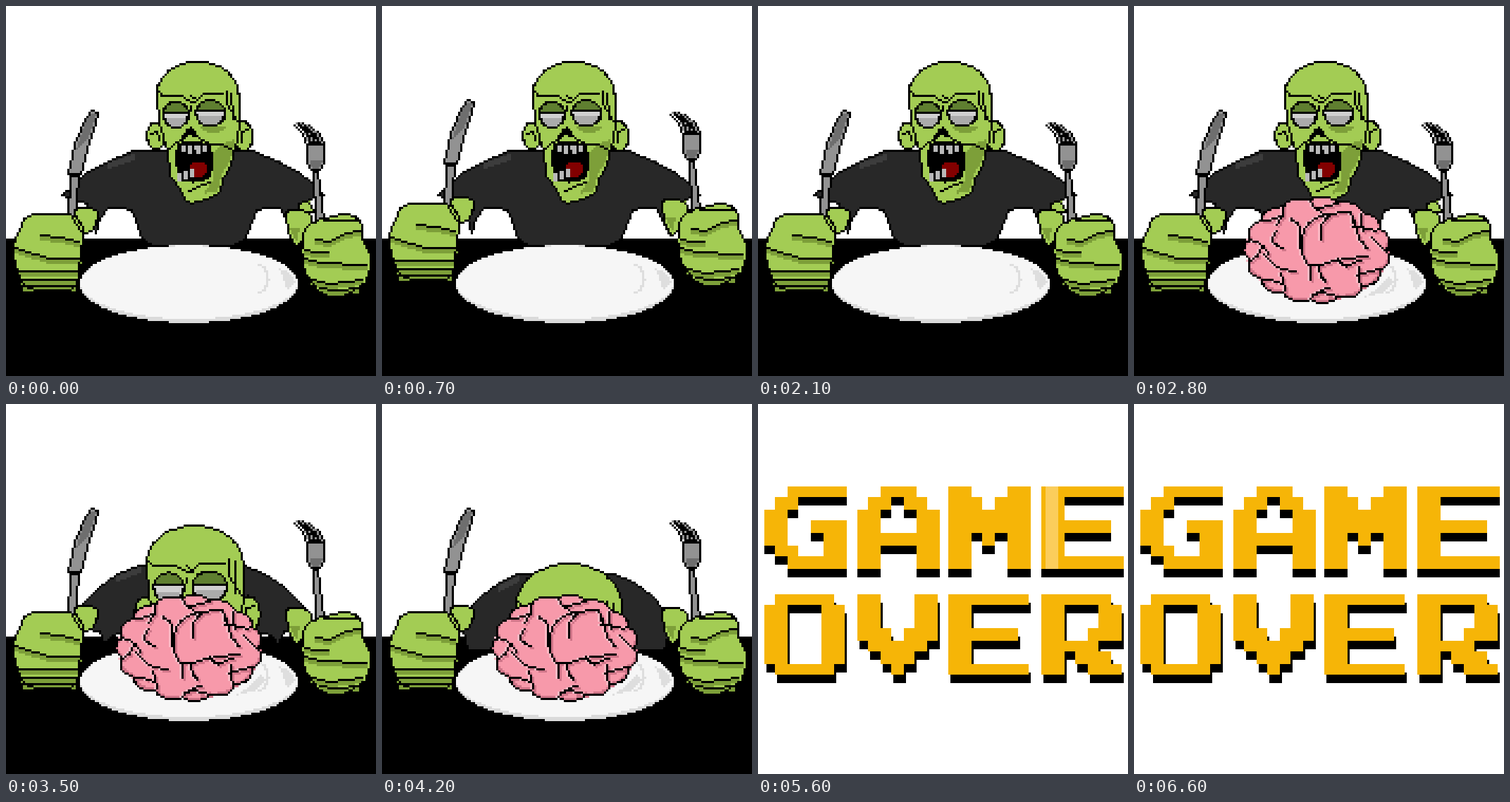
Recreate the animation shown at these times as an HTML page with a canvas. Size 525 px wide and 525 px high, loop 7 s.

```html
<!DOCTYPE html>
<html lang="en">
<head>
<meta charset="utf-8">
<title>Hungry zombie</title>
<style>
html, body { margin: 0; width: 100%; height: 100%; overflow: hidden; background: #fff; }
canvas { display: block; width: 525px; height: 525px; image-rendering: pixelated; }
</style>
</head>
<body>
<canvas id="stage" width="175" height="175"></canvas>
<script>
// Shapes use stage pixels; they are rasterised on a grid of 3px cells.
const CELL = 3, STEP = 100, LOOP = 7000;
const g = document.getElementById('stage').getContext('2d');
const SKIN = '#a3cc54', SHADE = '#7d9f39', LID = '#5f7f30', SHIRT = '#282828', PINK = '#f799aa',
  ROSE = '#cf7588', BLUSH = '#fbb9c4', STEEL = '#929292', IRON = '#6e6e6e', TOOTH = '#b9b9b9',
  EYE = '#d0d0d0', GOLD = '#f6b507', SHEEN = '#fbcd5c', BLACK = '#000';

const same = p => p;
const move = (dx, dy) => ([x, y]) => [x + dx, y + dy];
const range = (n, make) => Array.from({ length: n }, (_, i) => make(i));
const rect = (x, y, w, h, color) => { g.fillStyle = color; g.fillRect(x, y, w, h); };

function points(text) {
  const n = text.split(' ').map(Number);
  return range(n.length / 2, i => [n[2 * i], n[2 * i + 1]]);
}

// Catmull-Rom curve through a few key points.
function smooth(text, closed = false) {
  const p = points(text), n = p.length;
  const at = i => p[closed ? (i + n) % n : Math.min(Math.max(i, 0), n - 1)];
  const out = [];
  for (let i = 0; i < (closed ? n : n - 1); i++) {
    for (let t = 0; t < 1; t += .125) {
      out.push([0, 1].map(d => {
        const [a, b, c, e] = [-1, 0, 1, 2].map(j => at(i + j)[d]);
        return b + t / 2 * (c - a + t * (2 * a - 5 * b + 4 * c - e + t * (3 * (b - c) + e - a)));
      }));
    }
  }
  return closed ? out : [...out, p[n - 1]];
}

const arc = (cx, cy, rx, ry, from = 0, to = 2) => range(61, i => {
  const a = Math.PI * (from + (to - from) * i / 60);
  return [cx + rx * Math.cos(a), cy + ry * Math.sin(a)];
});

function fill(pts, color) {
  const p = pts.map(([x, y]) => [x / CELL, y / CELL]);
  for (let y = 0; y < 175; y++) {
    const c = y + .5, xs = [];
    p.forEach(([x1, y1], i) => {
      const [x2, y2] = p[(i + 1) % p.length];
      if ((y1 <= c) !== (y2 <= c)) xs.push(x1 + (c - y1) / (y2 - y1) * (x2 - x1));
    });
    xs.sort((a, b) => a - b);
    for (let i = 0; i + 1 < xs.length; i += 2) {
      const a = Math.round(xs[i]);
      rect(a, y, Math.round(xs[i + 1]) - a, 1, color);
    }
  }
}

function line(pts, color = BLACK) {
  const p = pts.map(q => q.map(v => Math.floor(v / CELL)));
  for (let i = 1; i < p.length; i++) {
    const [x, y] = p[i - 1], dx = p[i][0] - x, dy = p[i][1] - y;
    const n = Math.max(Math.abs(dx), Math.abs(dy), 1);
    for (let j = 0; j <= n; j++) rect(Math.round(x + dx * j / n), Math.round(y + dy * j / n), 1, 1, color);
  }
}

const outline = pts => line([...pts, pts[0]]);
function shape(pts, color, map = same) {
  const p = pts.map(map);
  fill(p, color);
  outline(p);
}
const patch = (text, color, map = same) => fill(points(text).map(map), color);

// Half of the shirt, as distance from the middle and height.
const shoulder = points('44 206 84 206 120 219 150 236 170 254 186 269');
const hem = points('174 272 150 280 140 323 132 302 122 287 104 285 88 290 80 312 72 330 56 339');

function drawBody(k) {
  if (!k) {
    shape(points('400 280 412 270 428 270 436 292 410 292'), SKIN);
    patch('416 273 428 272 433 281', SHADE);
  }
  const half = [...shoulder.map(([d, y]) => [d, y + 36 * k]), ...hem.map(([d, y]) => [d, y + (350 - y) * k])];
  const side = dir => half.map(([d, y]) => [266 - 4 * k + dir * d * (1 - .2 * k), y]);
  const left = side(-1);
  shape([...side(1), ...left.reverse()], SHIRT);
  left.reverse();
  for (const d of [4, 7, 10]) line(left.slice(1, 3).map(move(0, d)), '#3c3c3c');
}

function drawEye(cx, cy, rx, ry, m) {
  shape(arc(cx, cy, rx, ry), LID, m);
  shape(arc(cx, cy - 3, rx, ry + 3, 0, 1), EYE, m);
  fill(arc(cx, cy + 5, rx - 4, ry - 6, 0, 1).map(m), '#ababab');
}

function drawHead(drop) {
  const k = drop / 150, s = 1 + .3 * k;
  const m = ([x, y]) => [272 - 7 * k + (x - 272) * s, 78 + drop + (y - 78) * s];
  g.save();
  g.beginPath();
  g.rect(0, 0, 175, 113);
  g.clip();
  shape(arc(213, 184, 13, 19), SKIN, m);
  shape(arc(337, 185, 13, 21), SKIN, m);
  shape([...arc(272, 126, 58, 47, 1, 2), ...points('331 165 326 203 316 232 307 244 304 263 292 272 262 279 254 275 247 258 231 241 230 206 216 165')], SKIN, m);
  patch('326 188 306 196 294 210 294 246 281 266 300 264 306 241 318 218', SHADE, m);
  fill(arc(294, 171, 17, 9, 0, 1).map(m), SHADE);
  drawEye(241, 154, 18, 18, m);
  drawEye(290, 152, 21, 18, m);
  patch('247 189 258 173 265 172 274 187 267 187 262 182 254 188', BLACK, m);
  ['216 122 221 127 250 127 262 135 268 135 279 124 307 124', '262 127 271 134', '314 120 314 139 329 163',
    '320 123 321 161', '262 142 257 166', '206 180 215 177 217 190', '343 176 334 178 333 192',
    '231 203 242 194 253 188', '274 188 292 196 305 197 325 206', '258 263 279 254 289 250']
    .forEach(t => line(points(t).map(m)));
  shape(smooth('243 203 254 194 284 196 291 208 288 241 264 249 245 240', true), BLACK, m);
  fill(arc(273, 232, 13, 11).map(m), '#820000');
  const tooth = (x, y, h) => fill([[x, y], [x + 7, y], [x + 7, y + h], [x + 1, y + h]].map(m), TOOTH);
  for (let i = 0; i < 4; i++) tooth(248 + 10 * i, 198, i % 3 ? 12 : 9);
  for (let i = 0; i < 3; i++) tooth(243 + 9 * i, 237 - 3 * i, 12);
  g.restore();
}

function drawPlate() {
  fill(arc(259.5, 394.5, 154, 55), '#dadada');
  fill(arc(259.5, 392, 154, 52), '#f6f6f6');
  patch('388 373 400 376 412 392 399 402', '#dedede');
  line(arc(353, 387, 19, 21, -.4, .4), '#dedede');
}

// Brain: a scalloped ellipse, a crease hooking in from every notch, and the main folds.
const LOBES = 15;
const onBrain = (a, r) => [260 + 102 * r * Math.cos(a), 346 + 74 * r * Math.sin(a)];
const rim = range(180, i => {
  const a = i * Math.PI / 90;
  return onBrain(a, .96 + .06 * Math.abs(Math.sin(a * LOBES / 2)));
});
const creases = range(LOBES, i => range(9, j => {
  const a = i * 2 * Math.PI / LOBES;
  return onBrain(a + (i % 2 ? .03 : -.03) * j * j / 6, .96 - j * (.02 + .008 * (i % 3)));
}));
const folds = ['276 294 246 309 239 345 250 368 285 361 330 354', '264 332 270 304 302 291 312 308',
  '314 303 318 325 330 344', '222 301 236 315 234 342', '202 318 196 334 212 344',
  '290 358 300 369 322 361', '250 370 250 388', '262 367 265 381 272 391', '184 351 204 371 230 376'].map(t => smooth(t));

function drawBrain(m) {
  const lines = [...creases, ...folds];
  fill(rim.map(m), ROSE);
  fill(rim.map(([x, y]) => m([259 + (x - 259) * .97, 273 + (y - 273) * .97])), PINK);
  lines.forEach(f => line(f.map(move(3, 3)).map(m), ROSE));
  lines.forEach(f => line(f.map(move(-3, 0)).map(m), BLUSH));
  lines.forEach(f => line(f.map(m)));
  outline(rim.map(m));
}

function drawFist(keys, creases, m) {
  const base = smooth(keys, true).map(m);
  fill(base, SKIN);
  creases.forEach(t => {
    const crease = points(t).map(m);
    for (const d of [3, 6]) line(crease.map(move(0, d)), SHADE);
    line(crease);
  });
  outline(base);
}

function drawKnife(m) {
  shape(points('92 240 102 240 97 303 87 303'), STEEL, m);
  shape(points('122 149 130 151 127 167 118 193 106 239 87 238 97 196 112 160'), STEEL, m);
  patch('122 152 128 153 117 188 100 203 113 162', IRON, m);
}

function drawFork(m) {
  shape(points('437 234 443 234 450 308 440 308'), STEEL, m);
  for (let i = 0; i < 4; i++) {
    const tine = [[413 + 6.5 * i, 165 + 1.2 * i * i], [423 + 6.5 * i, 177 + i], [429 + 6.5 * i, 195]].map(m);
    line(tine.map(move(-3, 3)));
    line(tine.map(move(3, 0)));
    line(tine, STEEL);
  }
  shape(points('427 195 451 195 452 222 445 233 434 233 427 222'), STEEL, m);
  patch('430 219 450 219 444 231 435 231', IRON, m);
}

function drawHands(m) {
  drawKnife(m);
  shape(smooth('98 290 128 290 128 308 112 322', true), SKIN, m);
  drawFist('30 299 62 295 94 298 110 318 106 350 102 388 90 402 40 402 21 389 10 349 19 320',
    ['50 324 75 327 104 334', '12 343 60 357 105 358', '20 375 102 375', '21 388 101 388', '24 396 98 396'], m);
  line(points('93 300 105 319').map(m));
  drawFork(m);
  shape(smooth('400 291 424 291 434 306 412 339 401 318', true), SKIN, m);
  patch('402 316 417 316 412 335', SHADE, m);
  drawFist('425 316 455 300 490 297 505 310 505 330 516 353 510 390 472 413 444 405 424 375 420 342',
    ['440 331 460 333 480 323 502 318', '424 345 440 350 458 350', '424 357 445 364 510 366', '432 387 460 393 506 389', '444 400 470 404 498 399'], m);
  line(points('450 303 503 304').map(m));
}

const glyphs = {
  G: '..#####/.##..../##...../##..###/##...##/.##..##/..#####',
  A: '..###../.##.##./##...##/##...##/#######/##...##/##...##',
  M: '##...##/###.###/#######/#######/##.#.##/##...##/##...##',
  E: '#######/##...../##...../######./##...../##...../#######',
  O: '.#####./##...##/##...##/##...##/##...##/##...##/.#####.',
  V: '##...##/##...##/##...##/###.###/.#####./..###../...#...',
  R: '######./##...##/##...##/##..###/#####../##.###./##..###'
};

// Paints one letter; unit is the size of a dot, sheen an optional band from x to x + 6.
function letter(ch, x, y, unit, color, sheen = -9) {
  const at = i => Math.floor(i * unit);
  glyphs[ch].split('/').forEach((row, j) => [...row].forEach((dot, i) => {
    if (dot !== '#') return;
    const left = x + at(i), right = x + at(i + 1), top = y + at(j), h = at(j + 1) - at(j);
    rect(left, top, right - left, h, color);
    const a = Math.max(left, sheen), b = Math.min(right, sheen + 6);
    if (b > a) rect(a, top, b - a, h, SHEEN);
  }));
}

// Letters arrive in pairs, then a sheen crosses each in two steps.
function drawGameOver(n) {
  const lit = n - 50;
  [...'GAMEOVER'].slice(0, 2 * (n - 45)).forEach((ch, i) => {
    const row = i >> 2, x = Math.round(3.4 + 43.4 * (i % 4)), y = row ? 90 : 39, unit = row ? 5.55 : 5.6;
    letter(ch, x + row, y + 4, unit, BLACK);
    letter(ch, x, y, unit, GOLD, lit >> 1 === i ? x + (lit % 2 ? 28 : 2) : undefined);
  });
}

function drawScene(n) {
  const lean = Math.min(Math.max((n - 29) / 16, 0), 1);
  const drop = CELL * Math.floor(51 * (1 - (1 - lean) ** 2));
  rect(0, 110, 175, 65, BLACK);
  drawBody(Math.min(drop / 150, 1));
  drawHead(drop);
  drawPlate();
  if (n > 21) {
    const fall = Math.min((n - 21) / 7, 1);
    if (fall === 1) patch('322 415 345 402 362 384 368 392 352 407', '#dedede');
    drawBrain(move(0, -420 * (1 - fall ** 2)));
  }
  drawHands(move(0, n < 14 && n % 2 ? -15 : 0));
}

const start = performance.now();
let shown = -1;
function tick() {
  const n = Math.floor((performance.now() - start) % LOOP / STEP);
  if (n !== shown) {
    shown = n;
    rect(0, 0, 175, 175, '#fff');
    if (n < 46) drawScene(n); else drawGameOver(n);
  }
  requestAnimationFrame(tick);
}
tick();
</script>
</body>
</html>
```
